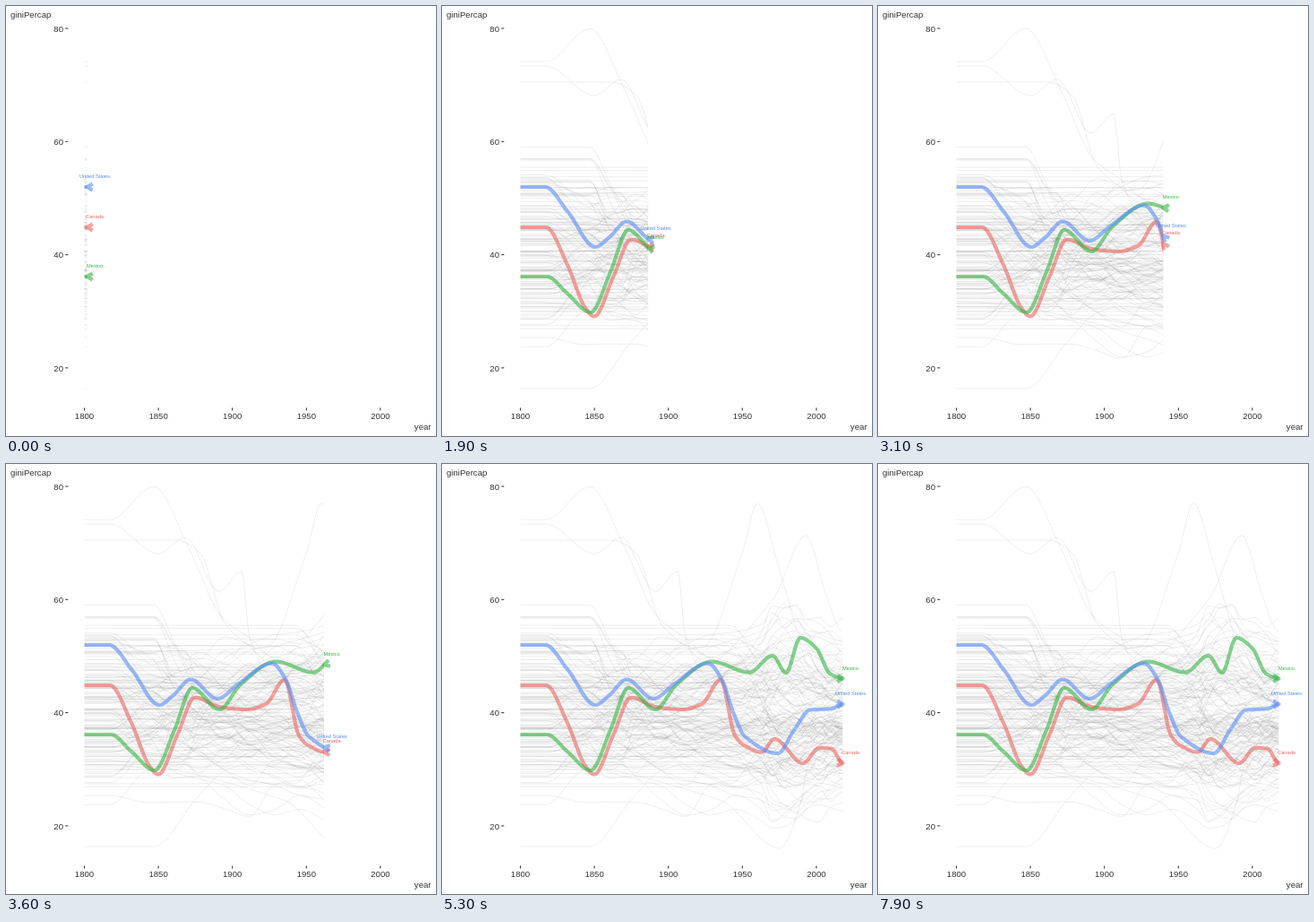
An HTML page that plays this animation: 480 px wide and 480 px high, repeating every 8000 ms.

```html
<!DOCTYPE html>
<html>
<head>
<meta charset="utf-8">
<style>
html, body { margin: 0; width: 100%; height: 100%; overflow: hidden; background: #fff; }
svg { display: block; width: 480px; height: 480px; }
text { font: 9.6px "Liberation Sans", Arial, sans-serif; fill: #333; }
.label { font-size: 5.69px; text-anchor: middle; }
path { fill: none; }
#greys path { stroke: #777; stroke-width: 1; opacity: .12; }
.series { stroke-width: 4.2; opacity: .6; stroke-linejoin: round; }
.tick { stroke: #333; stroke-width: 1.07; }
</style>
</head>
<body>
<svg viewBox="0 0 480 480">
  <clipPath id="reveal"><rect id="window" y="0" height="480" width="0"/></clipPath>
  <g id="axes"></g>
  <g clip-path="url(#reveal)"><g id="greys"></g><g id="lines"></g></g>
  <g id="heads"></g>
  <g id="labels"></g>
</svg>
<script>
const LEFT = 87.5, RIGHT = 447.5, START = 90.5, STEP = 7.35;
const $ = id => document.getElementById(id);

function add(parent, tag, attrs, text) {
  const el = document.createElementNS('http://www.w3.org/2000/svg', tag);
  for (const key in attrs) el.setAttribute(key, attrs[key]);
  if (text) el.textContent = text;
  return $(parent).appendChild(el);
}

let seed = 41;
function rand() {
  seed = (seed * 1664525 + 1013904223) % 4294967296;
  return seed / 4294967296;
}

// A flat start at height y, then "x,y x,y ..." turning points
const keys = (y, rest) => [[LEFT, y], ...rest.split(' ').map(p => p.split(',').map(Number))];

// Monotone cubic through the points, as a function of x
function curve(pts) {
  const slope = i => (pts[i + 1][1] - pts[i][1]) / (pts[i + 1][0] - pts[i][0]);
  const tangent = pts.map((_, i) => {
    if (!i || i === pts.length - 1) return 0;
    const a = slope(i - 1), b = slope(i);
    return a * b <= 0 ? 0 : 2 * a * b / (a + b);
  });
  return x => {
    let i = 0;
    while (i < pts.length - 2 && x > pts[i + 1][0]) i++;
    const [x0, y0] = pts[i], [x1, y1] = pts[i + 1], w = x1 - x0;
    const u = Math.min(1, (x - x0) / w), v = 1 - u;
    return v * v * (1 + 2 * u) * y0 + u * u * (3 - 2 * u) * y1
      + w * u * v * (v * tangent[i] - u * tangent[i + 1]);
  };
}

function trace(f) {
  let d = '';
  for (let x = LEFT; x <= RIGHT; x += 1.5) d += (d ? 'L' : 'M') + x + ' ' + f(x).toFixed(2);
  return d;
}

// Axes
add('axes', 'text', { x: 5, y: 13 }, 'giniPercap');
add('axes', 'text', { x: 474.5, y: 473, 'text-anchor': 'end' }, 'year');
for (let i = 0; i < 4; i++) {
  const y = 25 + i * 126.3;
  add('axes', 'text', { x: 64, y: y + 3.6, 'text-anchor': 'end' }, String(80 - 20 * i));
  add('axes', 'path', { class: 'tick', d: `M66.3 ${y}h3` });
}
for (let i = 0; i < 5; i++) {
  const x = LEFT + i * 82.6;
  add('axes', 'text', { x, y: 461, 'text-anchor': 'middle' }, String(1800 + 50 * i));
  add('axes', 'path', { class: 'tick', d: `M${x} 448.5v3` });
}

// Continue a line towards its own level; levels spread widest near x = 368
function wander(pts) {
  let [last, y] = pts[pts.length - 1];
  const level = (rand() + rand() - 1) * 130;
  for (let x = 160; x < 455; x += x < 330 ? 28 : 13) {
    if (x < last + 8) continue;
    const spread = .75 + .5 * Math.exp(-(((x - 368) / 25) ** 2));
    const noise = (rand() * 2 - 1) * (x < 330 ? 22 : 14);
    y += (288 + level * spread - y) * .35 + noise;
    pts.push([x, y]);
  }
  return pts;
}

// Background lines: a few extremes, then a random crowd
const crowd = [
  keys(62, '116,62 165,25.5 205,96 240,170'),
  keys(67, '116,67 170,100 200,82 238,142 263,120'),
  keys(85, '190,85 217,100'),
  keys(427, '165,427 212,374'),
  keys(210, '290,205 335,100 352,44 375,112'),
  keys(230, '280,230 370,150 406,80 430,150'),
  keys(330, '310,375 377,429 400,380')
];
for (let i = 0; i < 150; i++) {
  const y = 150 + 150 * rand() + 90 * rand(), r = rand();
  const hold = r < .35 ? 116 : r < .5 ? 165 : r < .65 ? 200 : 322;
  crowd.push([[LEFT, y], [hold, y]]);
}
for (const pts of crowd) add('greys', 'path', { d: trace(curve(wander(pts))) });

// Highlighted series
const series = [
  ['Canada', '#EC6660', keys(247, '116,247 140,289 160,337 170,346.5 191,303 211,260.5 238,271 268,274 290,268 311,241 327,303 338,314.5 357,321.5 371,307 403,334 421,317 435,318 447.5,334')],
  ['Mexico', '#34B444', keys(302, '117,302 140,321 166,342 188,297 208,250 238,274 262,246 301,220.5 343,232.5 369,214 384,233 400,194 418,206 433,234 447.5,239.5')],
  ['United States', '#5A8DF8', keys(202, '115,202 140,229 171,269 187,258 206,240.5 236,262 260,245 297,222.5 312,240 325,277 338,304 375,323 393,297 411,274.5 435,273 447.5,268')]
].map(([name, color, points]) => {
  const at = curve(points);
  add('lines', 'path', { class: 'series', stroke: color, d: trace(at) });
  return {
    at,
    head: add('heads', 'path', { class: 'series', stroke: color }),
    label: add('labels', 'text', { class: 'label', style: 'fill:' + color }, name)
  };
});

function draw(now) {
  const frame = Math.floor(now % 8000 / 100);
  const x = Math.min(RIGHT, START + STEP * frame);
  $('window').setAttribute('width', x);
  // arms open forward while moving, backward at rest
  const arm = x < RIGHT ? 6.2 : -6.2;
  for (const { at, head, label } of series) {
    const y = at(x);
    const tilt = Math.atan(.15 * (y - at(x - 2))) * 180 / Math.PI;
    head.setAttribute('d', `M${arm} -3.6L0 0L${arm} 3.6`);
    head.setAttribute('transform', `translate(${x} ${y}) rotate(${tilt})`);
    label.setAttribute('x', x + 8.5);
    label.setAttribute('y', y - 10);
  }
}

function loop() {
  draw(performance.now());
  requestAnimationFrame(loop);
}
loop();
</script>
</body>
</html>
```
